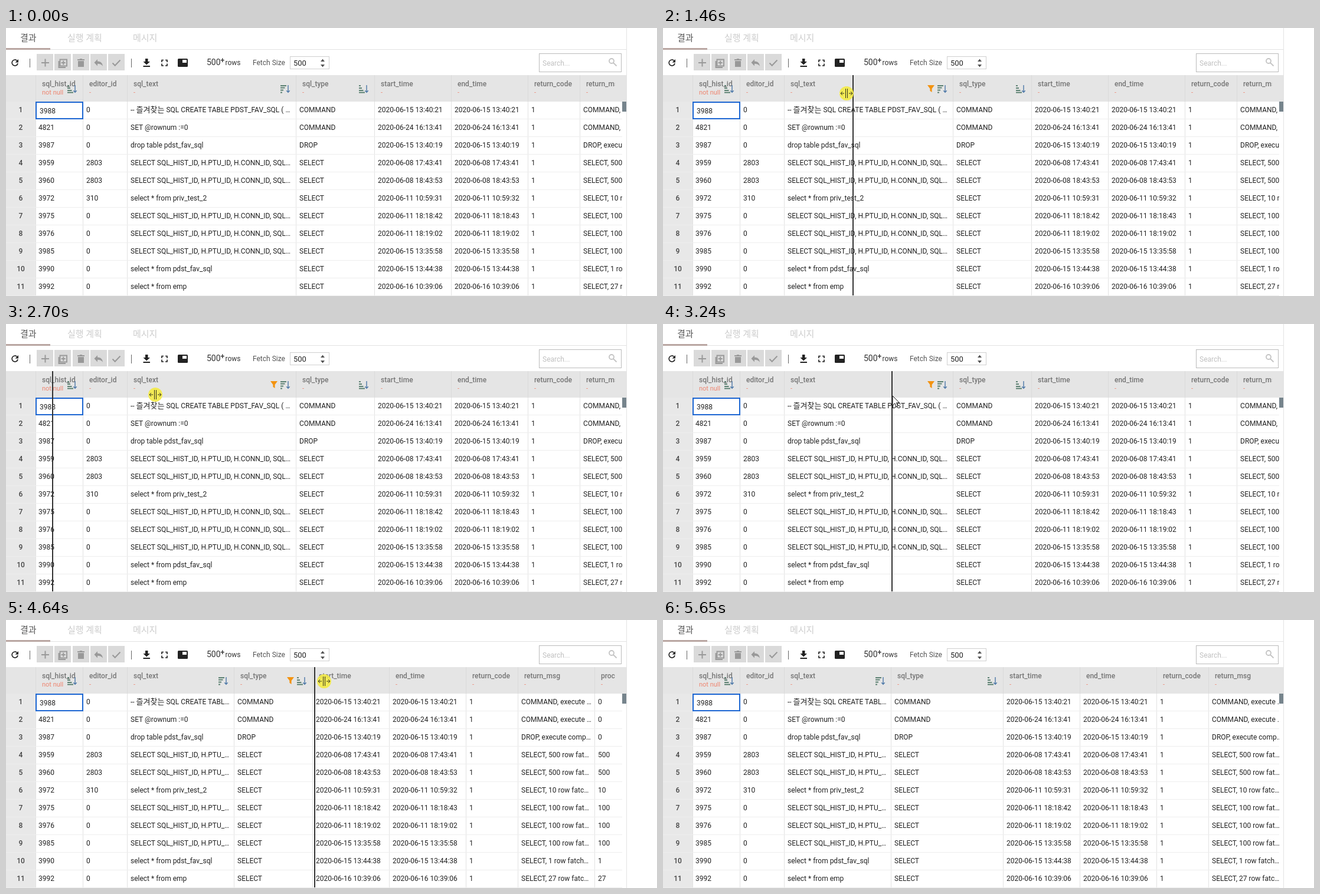
An HTML page for the animation above (6.51 s loop, 1103 by 455 pixels).

```html
<!DOCTYPE html>
<html lang="ko">
<head>
<meta charset="utf-8">
<style>
html, body { margin: 0; width: 100%; height: 100%; overflow: hidden; background: #fff; }
svg { display: block; width: 1103px; height: 455px; font: 12px Roboto, "Noto Sans CJK KR", "Noto Sans CJK", sans-serif; }
text { white-space: pre; }
.head { font-weight: 500; fill: #757575; }
.sub { font-size: 11px; fill: #ee8570; }
.num { font-weight: 500; fill: #444; text-anchor: middle; }
.cell { fill: #222; }
.hangul { font-size: 13px; }
.tab { font-size: 15px; }
</style>
</head>
<body>
<svg viewBox="0 0 1103 455">
  <defs>
    <clipPath id="headClip"><path d="M0 80H1032V125H0z"/></clipPath>
    <clipPath id="bodyClip"><path d="M0 125H1044V455H0z"/></clipPath>
    <path id="down" d="M13 0V12M10.3 9.3L13 12.3L15.7 9.3" fill="none" stroke="#4d78a8" stroke-width="1.4"/>
    <path id="bars" d="M0 1H3M0 5H5M0 9H7.5M0 12.5H10" stroke="#5c8172" stroke-width="2"/>
    <g id="asc"><use href="#bars"/><use href="#down"/></g>
    <g id="desc"><use href="#bars" transform="matrix(1 0 0 -1 0 13.5)"/><use href="#down"/></g>
    <path id="funnel" d="M0 0H12L7.6 6V12L4.4 9.8V6z" fill="#f39310"/>
  </defs>
  <g id="toolbar"></g>
  <g id="grids"></g>
  <use id="filter" href="#funnel" y="97"/>
  <use id="hoverSort" href="#asc" y="97"/>
  <rect id="guide" y="80" width="2" height="374" fill="#333"/>
  <circle id="press" r="12" fill="#f3ea45" opacity=".9"/>
  <path id="arrow" d="M0 0V16.2L3.8 12.7L6.4 18.6L9 17.5L6.5 11.8H11.6z" fill="#fff" stroke="#111" stroke-linejoin="round"/>
  <path id="resize" d="M-1.5 -8V8M1.5 -8V8M-10 0H-4M10 0H4M-7 -3L-10 0L-7 3M7 -3L10 0L7 3" fill="none" stroke="#33331c"/>
</svg>
<script>
const $ = id => document.getElementById(id);
const text = (x, y, s, cls = '', attrs = '') => `<text x="${x}" y="${y}" class="${cls}" ${attrs}>${s}</text>`;
const rect = (x, y, w, h, fill, attrs = '') => `<rect x="${x}" y="${y}" width="${w}" height="${h}" fill="${fill}" ${attrs}/>`;
const path = (d, fill, attrs = '') => `<path d="${d}" fill="${fill}" ${attrs}/>`;
const outline = (d, color, w) => path(d, 'none', `stroke="${color}" stroke-width="${w}"`);

// Tabs and toolbar
const tools = [
  outline('M60 59H73M66.5 52.5V65.5', '#999', 2),
  outline('M91.5 53.5H103V64.5H91.5zM89.5 56V67H101M97.2 55.5V62.5M93.7 59H100.7', '#999', 1.9),
  path('M122 56H132V66H122zM121 53H124.5L125.5 52H128.5L129.5 53H133V55H121z', '#999'),
  path('M155 53V56.5C161 56.5 163.5 60 164 65C162 61.8 159.5 60.8 155 60.8V64.5L149.5 58.7z', '#999'),
  outline('M180.5 59.5L184.7 63.7L193.5 54.5', '#999', 2)
];
$('toolbar').innerHTML =
  text(24, 22, '결과', 'tab', 'fill="#555"') +
  text(104, 22, '실행 계획', 'tab', 'fill="#ccc"') +
  text(215, 22, '메시지', 'tab', 'fill="#ccc"') +
  rect(0, 36, 1051, 1, '#e2e2e2') + rect(0, 34, 75, 3, '#b9a6a2') +
  rect(1051, 0, 1, 455, '#e4e4e4') +
  outline('M18.7 55.5A5 5 0 1 0 20 60', '#222', 1.7) + path('M21 53V58.5H15.5z', '#222') +
  rect(40, 52, 1, 15, '#666') + rect(212, 52, 1, 15, '#666') +
  tools.map((icon, i) => rect(Math.round(52 + 30.3 * i), 44, 28, 28, '#dadada') + icon).join('') +
  path('M236 52H240.5V57H244L238.2 62.5L232.5 57H236zM232.5 64H244V66H232.5z', '#222') +
  outline('M264 58V54.5H267M270 54.5H273V58M273 60.5V64H270M267 64H264V60.5', '#222', 1.7) +
  rect(291, 52, 17, 14, '#222', 'rx="1.5"') + rect(299, 54, 7, 5, '#fff') +
  text(340, 63, '500', '', 'font-size="14" fill="#333"') +
  text(363.5, 59, '+', '', 'fill="#333" font-weight="500"') +
  text(371.5, 63, 'rows', '', 'fill="#333"') +
  text(418, 63, 'Fetch Size', '', 'fill="#555"') +
  rect(481.5, 48.5, 66, 21, '#fff', 'stroke="#d0d0d0"') +
  text(487, 64, '500', '', 'font-size="13" fill="#222"') +
  path('M533 57L536.5 52.5L540 57zM533 62L536.5 66.5L540 62z', '#555') +
  rect(903.5, 43.5, 139, 31, '#fff', 'stroke="#bbb"') +
  text(909, 64, 'Search...', '', 'fill="#c0c0c0"') +
  outline('M1030 56A4 4 0 1 0 1022 56A4 4 0 1 0 1030 56M1029 59L1034.5 64.5', '#c4c4c4', 1.8);

// Table content; long SQL has a wide and a narrow form
const names = ['sql_hist_id', 'editor_id', 'sql_text', 'sql_type', 'start_time', 'end_time', 'return_code', 'return_msg', 'process_row'];
const sorts = { sql_hist_id: 'asc', sql_text: 'desc', sql_type: 'asc' };
const query = ['SELECT SQL_HIST_ID, H.PTU_ID, H.CONN_ID, SQL…', 'SELECT SQL_HIST_ID, H.PTU_…'];
const create = ['( …', '…'].map((tail, i) =>
  '-- <tspan class="hangul">즐겨찾는</tspan> SQL CREATE TABL' + (i ? '' : 'E PDST_FAV_SQL ') + tail);

// id, editor, SQL, type, start, seconds taken, row count
const rows = [
  ['3988', '0', create, 'COMMAND', '15 13:40:21', 0, 0],
  ['4821', '0', 'SET @rownum :=0', 'COMMAND', '24 16:13:41', 0, 0],
  ['3987', '0', 'drop table pdst_fav_sql', 'DROP', '15 13:40:19', 0, 0],
  ['3959', '2803', query, 'SELECT', '08 17:43:41', 0, 500],
  ['3960', '2803', query, 'SELECT', '08 18:43:53', 0, 500],
  ['3972', '310', 'select * from priv_test_2', 'SELECT', '11 10:59:31', 1, 10],
  ['3975', '0', query, 'SELECT', '11 18:18:42', 1, 100],
  ['3976', '0', query, 'SELECT', '11 18:19:02', 0, 100],
  ['3985', '0', query, 'SELECT', '15 13:35:58', 0, 100],
  ['3990', '0', 'select * from pdst_fav_sql', 'SELECT', '15 13:44:38', 0, 1],
  ['3992', '0', 'select * from emp', 'SELECT', '16 10:39:06', 0, 27]
];

function cells([id, editor, sql, type, start, secs, count], narrow) {
  const from = '2020-06-' + start;
  const to = from.slice(0, -2) + String(+from.slice(-2) + secs).padStart(2, '0');
  const msg = count ? `${type}, ${count} row fatched`.slice(0, 19)
    : `${type}, execute ` + (type === 'DROP' ? 'comp' : '');
  return [id, editor, Array.isArray(sql) ? sql[narrow] : sql, type, from, to, '1', msg + '…', count];
}

// Left edges of all columns for given sql_text and sql_type widths
function edgesFor(textWidth, typeWidth) {
  let x = 50;
  return [0, 80, 75, textWidth, typeWidth, 130, 130, 88, 130, 130].map(w => x += w);
}
const layouts = [edgesFor(286, 133), edgesFor(181, 133), edgesFor(181, 190)];

function grid(edges, i) {
  let head = '', body = '';
  names.forEach((name, c) => {
    const x = edges[c] + 11;
    head += rect(edges[c], 80, 1, 45, '#dadada') + text(x, 99, name, 'head') +
      text(x, 113, c ? '-' : 'not null', 'sub');
    if (sorts[name]) head += `<use href="#${sorts[name]}" x="${edges[c + 1] - 26}" y="97"/>`;
    body += rect(edges[c], 125, 1, 330, '#e2e2e2');
  });
  rows.forEach((row, n) => {
    const y = 143 + 30 * n;
    body += rect(0, y + 11, 1044, 1, '#eee') + text(25, y, n + 1, 'num');
    cells(row, i ? 1 : 0).forEach((s, c) => {
      const selected = n + c === 0;
      body += text(edges[c] + (selected ? 7 : c ? 6 : 5), selected ? y + 2 : y, s, 'cell');
    });
  });
  return `<g id="grid${i}">` + rect(0, 80, 1051, 45, '#e5e5e5') + rect(0, 125, 50, 330, '#e8e8e8') +
    `<g clip-path="url(#headClip)">${head}</g><g clip-path="url(#bodyClip)">${body}</g>` +
    rect(51, 126, 79, 28, 'none', 'stroke="#1c66d2" stroke-width="2"') +
    rect(1044, 125, 7, 17, '#76848c') + '</g>';
}
$('grids').innerHTML = layouts.map(grid).join('');

// Pointer strokes: start, end, x, y reached; it rests in between
const strokes = [
  [70, 680, 484, 97], [740, 760, 493, 106],
  [1200, 1300, 582, 108], [1300, 1500, 309, 111], [1540, 1840, 254, 116],
  [1920, 1990, 238.5, 117], [2030, 2230, 246, 117],
  [2340, 2430, 449, 118], [2450, 2550, 43, 119], [2660, 2850, 449, 121], [2860, 3010, 388.5, 122],
  [3440, 3790, 545, 97], [3900, 4080, 527, 103], [4170, 4320, 521, 104],
  [4600, 4950, 578.5, 104], [5390, 5650, 927, 325]
];

function pointer(t) {
  let x = 900, y = 381;
  for (const [start, end, toX, toY] of strokes) {
    const u = Math.min(1, Math.max(0, (t - start) / (end - start)));
    const ease = 1 - (1 - u) ** 3;
    x += (toX - x) * ease;
    y += (toY - y) * ease;
  }
  return [x, y];
}

// Name of the hovered column from each time on
const hovers = [[0, ''], [600, 'sql_text'], [3310, 'sql_type'], [3560, 'start_time'], [4320, 'sql_type'], [5020, 'start_time'], [5420, '']];
const show = (id, on) => $(id).style.display = on ? '' : 'none';

function frame(now) {
  const t = now % 6510;
  const within = (a, b) => t >= a && t < b;
  const layout = t < 3310 ? 0 : t < 5100 ? 1 : 2;
  const [x, y] = pointer(t);
  const hovered = hovers.filter(h => h[0] <= t).pop()[1];
  const resizing = within(760, 3240) || within(4320, 5020) || within(5100, 5420);

  layouts.forEach((_, i) => show('grid' + i, i === layout));
  show('filter', hovered);
  show('hoverSort', hovered === 'start_time');
  const right = layouts[layout][names.indexOf(hovered) + 1];
  $('filter').setAttribute('x', right - 43);
  $('hoverSort').setAttribute('x', right - 26);

  show('guide', within(1080, 3310) || within(4566, 5100));
  $('guide').setAttribute('x', Math.round(pointer(t - 35)[0] - 2)); // trails the pointer
  show('press', within(990, 3240) || within(4490, 5020));
  show('resize', resizing);
  show('arrow', within(70, 5650) && !resizing);
  const place = `translate(${Math.round(x)} ${Math.round(y)})`;
  for (const id of ['press', 'resize', 'arrow']) $(id).setAttribute('transform', place);
  requestAnimationFrame(frame);
}
requestAnimationFrame(frame);
</script>
</body>
</html>
```
